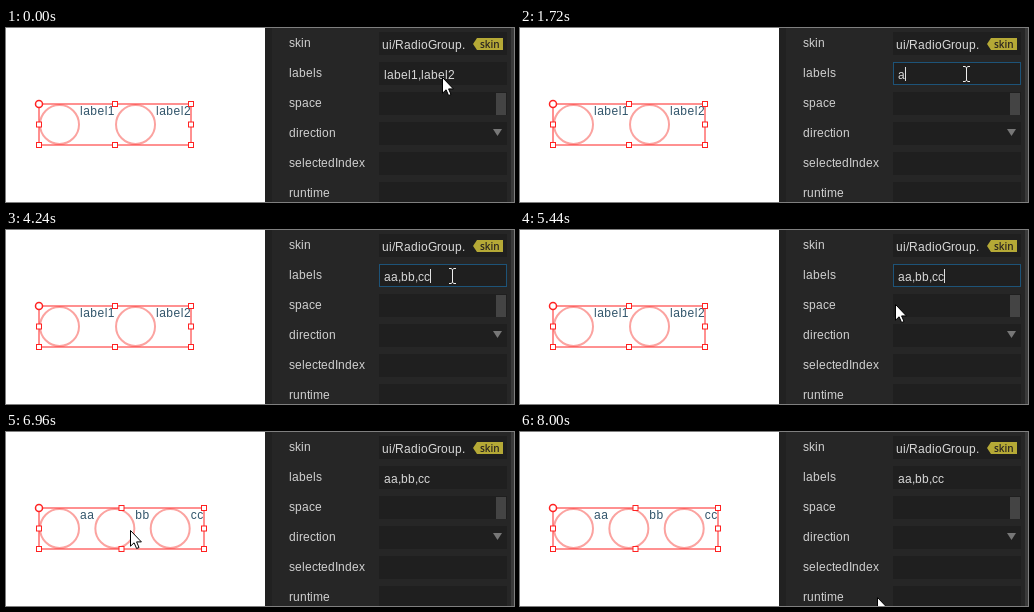
An HTML page for the animation above (9.04 s loop, 508x174 px).

```html
<!DOCTYPE html>
<html lang="en">
<head>
<meta charset="utf-8">
<title>Editing radio group labels</title>
<style>
  html, body { margin: 0; width: 100%; height: 100%; overflow: hidden; background: #fff; }
  svg { display: block; }
  text { font: 12px "Liberation Sans", Arial, sans-serif; white-space: pre; }
  .tag { font: 600 10px "Open Sans", "Noto Sans", sans-serif; }
</style>
</head>
<body>
<svg id="stage" width="508" height="174" viewBox="0 0 508 174">
  <g id="panel"></g>
  <g id="scene"></g>
</svg>
<script>
const LOOP = 9040, TICK = 40, BLINK = 425;
const FOCUS = 560, SELECT = 600, PRESS = 6160, BLUR = 6200, REBUILD = 6240;
const ROW = 30, RING = 41, GROUP_X = 33, GROUP_Y = 76, FIELD_X = 378;
const OLD_TEXT = 'label1,label2', NEW_TEXT = 'aa,bb,cc';

// The first key clears the selection, each later one types a character
const keyTimes = [1360, 1720, 1840, 2320, 2640, 2760, 3040, 3240, 3360];

// Pointer moves: start, end, destination
const moves = [
  [200, 400, 445, 45], [520, 560, 446, 46],
  [5280, 5440, 375, 74], [5440, 5920, 120, 99],
  [6920, 6960, 124, 98], [6960, 7280, 165, 97], [7480, 7640, 194, 180],
  [7880, 7920, 282, 171], [7920, 8000, 357, 165]
];

const panel = document.getElementById('panel');
const scene = document.getElementById('scene');

const ruler = document.createElement('canvas').getContext('2d');
ruler.font = '1200px "Liberation Sans", Arial, sans-serif';
const natural = ch => ruler.measureText(ch).width / 100;
const hinted = ch => Math.round(natural(ch));    // form fields: whole-pixel advances
const spaced = ch => natural(ch) + .5;           // canvas labels: slightly loose
const widthOf = (str, advance) => [...str].reduce((sum, ch) => sum + advance(ch), 0);

function text(str, x, y, fill, advance = hinted) {
  const xs = [...str].map((ch, i) => +(x + widthOf(str.slice(0, i), advance)).toFixed(2));
  return `<text x="${xs.join(' ')}" y="${y}" fill="${fill}">${str}</text>`;
}
const rect = (x, y, w, h, fill, extra = '') =>
  `<rect x="${x}" y="${y}" width="${w}" height="${h}" fill="${fill}" ${extra}/>`;

function drawPanel() {
  const rows = ['skin', 'labels', 'space', 'direction', 'selectedIndex', 'runtime'];
  return rect(259, 0, 249, 174, '#262626') + rect(259, 0, 7, 174, '#212121') +
    rect(505, 0, 3, 174, '#3a3a3a') +
    rows.map((name, i) =>
      text(name, 283, 19 + ROW * i, '#d0d0d0') + rect(373, 4 + ROW * i, 128, 23, '#1f1f1f')
    ).join('') +
    text('ui/RadioGroup.', 376, 21, '#d8d8d8') +
    '<path d="M467 16L471 10H497V22H471Z" fill="#b5a936"/>' +
    '<text class="tag" x="474" y="20" fill="#2b2620">skin</text>' +
    rect(490, 65, 10, 22, '#444') +
    '<path d="M487 101H496L491.5 108Z" fill="#777"/>';
}

// Each radio is a ring followed directly by its label
function layout(t) {
  let x = GROUP_X;
  return (t < REBUILD ? OLD_TEXT : NEW_TEXT).split(',').map(label => {
    const item = { label, x, end: x + RING + widthOf(label, spaced) };
    x = item.end;
    return item;
  });
}

function pointer(t) {
  let x = 436, y = 49;
  for (const [start, end, toX, toY] of moves) {
    const k = Math.min(1, Math.max(0, (t - start) / (end - start)));
    x += (toX - x) * k;
    y += (toY - y) * k;
  }
  return { x: Math.round(x), y: Math.round(y) };
}

function itemUnderPointer(t) {
  const { x, y } = pointer(t);
  if (y < GROUP_Y || y > GROUP_Y + RING) return -1;
  return layout(t).findIndex(item => x >= item.x && x < item.end);
}

// A rebuilt item already under the pointer gets no hover state
function hoveredItem(t) {
  const hit = itemUnderPointer(t);
  return t >= REBUILD && hit === itemUnderPointer(REBUILD) ? -1 : hit;
}

function drawGroup(t) {
  const items = layout(t), hovered = hoveredItem(t);
  const right = Math.round(items[items.length - 1].end), bottom = GROUP_Y + RING;
  const midX = (GROUP_X + right) / 2, midY = GROUP_Y + RING / 2;
  let out = items.map(({ label, x }, i) => {
    const [ring, ink] = i === hovered ? ['#f5544c', '#32cc6b'] : ['#fba3a0', '#32556b'];
    return `<circle cx="${x + RING / 2}" cy="${midY}" r="19.5" fill="none" stroke="${ring}" stroke-width="2"/>` +
      text(label, x + RING, 87, ink, spaced);
  }).join('');
  out += rect(GROUP_X, GROUP_Y, right - GROUP_X, RING, 'none', 'stroke="#f22"');
  for (const x of [GROUP_X, midX, right])
    for (const y of [GROUP_Y, midY, bottom])
      if (x !== midX || y !== midY) out += rect(x - 2.5, y - 2.5, 5, 5, '#fff', 'stroke="#f22"');
  return out + `<circle cx="${GROUP_X}" cy="${GROUP_Y}" r="3.5" fill="#fff" stroke="#f22" stroke-width="1.5"/>`;
}

function drawField(t) {
  const keys = keyTimes.filter(time => time <= t);
  const value = keys.length ? NEW_TEXT.slice(0, keys.length - 1) : OLD_TEXT;
  const width = widthOf(value, hinted);
  const selected = t >= SELECT && !keys.length;
  const caretOn = keys.length && t < PRESS && (t - keys[keys.length - 1]) % (2 * BLINK) < BLINK;
  let out = '';
  if (t >= FOCUS && t < BLUR) out += rect(373.5, 34.5, 127, 22, 'none', 'stroke="#1d5378"');
  if (selected) out += rect(FIELD_X, 39, width, 14, '#0a63cc');
  out += text(value, FIELD_X, 51, selected ? '#fff' : '#d8d8d8');
  if (caretOn) out += rect(FIELD_X + width, 39, 1, 14, '#e0e0e0');
  return out;
}

function drawCursor(t) {
  const { x, y } = pointer(t);
  const beam = t >= FOCUS && x > 373 && y < 57;
  const shape = beam
    ? '<path d="M-3 -7.5H-1L.5 -6.5L2 -7.5H4M-3 7.5H-1L.5 6.5L2 7.5H4M.5 -6.5V6.5" fill="none" stroke="#eee"/>'
    : '<path d="M.5 .5V16.2L4.1 12.8L6.6 18.5L9 17.5L6.6 11.9H11.4Z" fill="#fff" stroke="#000"/>';
  return `<g transform="translate(${x} ${y})">${shape}</g>`;
}

panel.innerHTML = drawPanel();
const start = performance.now();
let shown = -1;
function frame() {
  const t = Math.floor(((performance.now() - start) % LOOP) / TICK) * TICK;
  if (t !== shown) {
    shown = t;
    scene.innerHTML = drawGroup(t) + drawField(t) + drawCursor(t);
  }
  requestAnimationFrame(frame);
}
frame();
</script>
</body>
</html>
```
